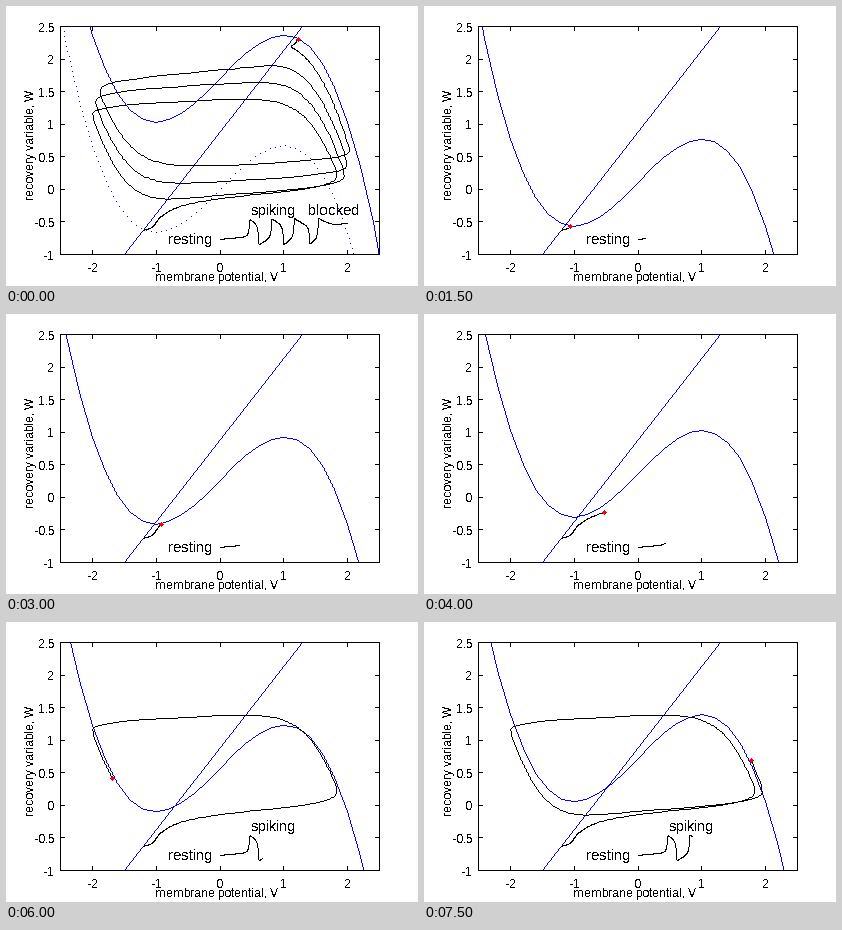
Write a matplotlib script that moves like this. It is 412 px wide and 280 px high and loops after 8000 ms.

```python
import numpy as np
import matplotlib.pyplot as plt
from matplotlib.animation import FuncAnimation

W_PX, H_PX, DPI = 412, 280, 64
PX = 72 / DPI                       # one pixel in points
LEFT, RIGHT, TOP, BOTTOM = 54, 373, 21, 249
FRAMES, INTERVAL = 16, 500
LAST = 33                           # final stage of the current ramp
T_END, I_END = 200, 1.7
DT = 0.25
STEPS = round(T_END / DT)
BLUE, RED, BLACK = "#0000ff", "#ff0000", "black"

plt.rcParams.update({
    "font.family": "Liberation Sans",
    "text.antialiased": False,
    "text.hinting": "force_autohint",
    "text.hinting_factor": 1,
})


def cubic(v, current):
    return v - v ** 3 / 3 + current


def integrate():
    """FitzHugh-Nagumo under a slowly rising current (Euler)."""
    v, w = -1.2, -0.625
    path = [(v, w)]
    for i in range(STEPS):
        dv = cubic(v, I_END * i / STEPS) - w
        dw = 0.08 * (v + 0.7 - 0.8 * w)
        v, w = v + dv * DT, w + dw * DT
        path.append((v, w))
    return np.array(path).T


def to_px(v, w):
    x = LEFT + (np.asarray(v) + 2.5) * (RIGHT - LEFT) / 5
    y = TOP + (2.5 - np.asarray(w)) * (BOTTOM - TOP) / 3.5
    return x, y


def raster(x, y):
    """Pixels of a one-pixel polyline, clipped to the plot box."""
    pts = np.rint(np.column_stack([x, y])).astype(int)
    parts = [pts[:1]]
    for a, b in zip(pts[:-1], pts[1:]):
        n = abs(b - a).max()
        parts.append(np.rint(a + np.outer(np.arange(1, n + 1) / max(n, 1), b - a)))
    p = np.vstack(parts)
    inside = ((p >= (LEFT, TOP)) & (p <= (RIGHT, BOTTOM))).all(axis=1)
    return p[inside].T


V, W = integrate()
T = np.arange(STEPS + 1) * DT
grid = np.arange(-13, 14) / 5

fig = plt.figure(figsize=(W_PX / DPI, H_PX / DPI), dpi=DPI, facecolor="white")
ax = fig.add_axes([0, 0, 1, 1])
ax.set(xlim=(0, W_PX), ylim=(H_PX, 0))
ax.axis("off")


def pixels(color, z):
    return ax.plot([], [], ",", color=color, zorder=z)[0]


def put(layer, x, y):
    layer.set_data(x + 0.25, y + 0.25)


def line(color, z, x, y):
    layer = pixels(color, z)
    put(layer, *raster(x, y))


def label(x, y, text, size=12, ha="left", **kw):
    return ax.text(x, y, text, fontsize=size * PX, ha=ha, va="baseline", **kw)


line(BLACK, 5, [LEFT, RIGHT, RIGHT, LEFT, LEFT],
     [TOP, TOP, BOTTOM, BOTTOM, TOP])
for v in range(-2, 3):
    x, _ = to_px(v, 0)
    line(BLACK, 5, [x, x], [TOP, TOP + 4])
    line(BLACK, 5, [x, x], [BOTTOM - 4, BOTTOM])
    label(x + 0.5, 266, str(v), ha="center")
for w in np.arange(-1, 2.6, 0.5):
    _, y = to_px(0, w)
    line(BLACK, 5, [LEFT, LEFT + 4], [y, y])
    line(BLACK, 5, [RIGHT - 4, RIGHT], [y, y])
    label(48, y + 4.5, f"{w:g}", ha="right")
label(211, 275, "membrane potential, V", ha="center")
label(28, 139, "recovery variable, W", ha="center",
      rotation=90, rotation_mode="anchor")
label(162, 238, "resting", 15)
spiking = label(245, 209, "spiking", 15)
blocked = label(302, 209, "blocked", 15)

line(BLUE, 2, *to_px([-1.5, 1.3], [-1, 2.5]))
rest_curve = pixels(BLUE, 2)
put(rest_curve, *raster(*to_px(grid, cubic(grid, 0)))[:, ::5])
nullcline = pixels(BLUE, 2)
orbit = pixels(BLACK, 3)
trace = pixels(BLACK, 3)
dot = pixels(RED, 4)
dx, dy = np.mgrid[-2:3, -2:3].reshape(2, -1)
diamond = np.array([dx, dy])[:, abs(dx) + abs(dy) <= 2]


def update(k):
    stage = (k - 1) % (LAST + 1)    # the loop opens on the final stage
    n = round(stage * STEPS / LAST) + 1
    v, w = V[:n], W[:n]
    put(nullcline, *raster(*to_px(grid, cubic(grid, I_END * stage / LAST))))
    put(orbit, *raster(*to_px(v, w)))
    put(trace, *raster(*to_px(T[:n] / 100, 0.1 * v - 0.65)))
    cx, cy = to_px(v[-1], w[-1])
    put(dot, np.rint(cx) + diamond[0], np.rint(cy) + diamond[1])
    spiking.set_visible(stage >= 8)
    blocked.set_visible(stage >= 25)
    rest_curve.set_visible(stage == LAST)
    return nullcline, orbit, trace, dot, spiking, blocked, rest_curve


anim = FuncAnimation(fig, update, frames=FRAMES, interval=INTERVAL,
                     init_func=lambda: update(0), repeat=True, repeat_delay=0)
plt.show()
```
